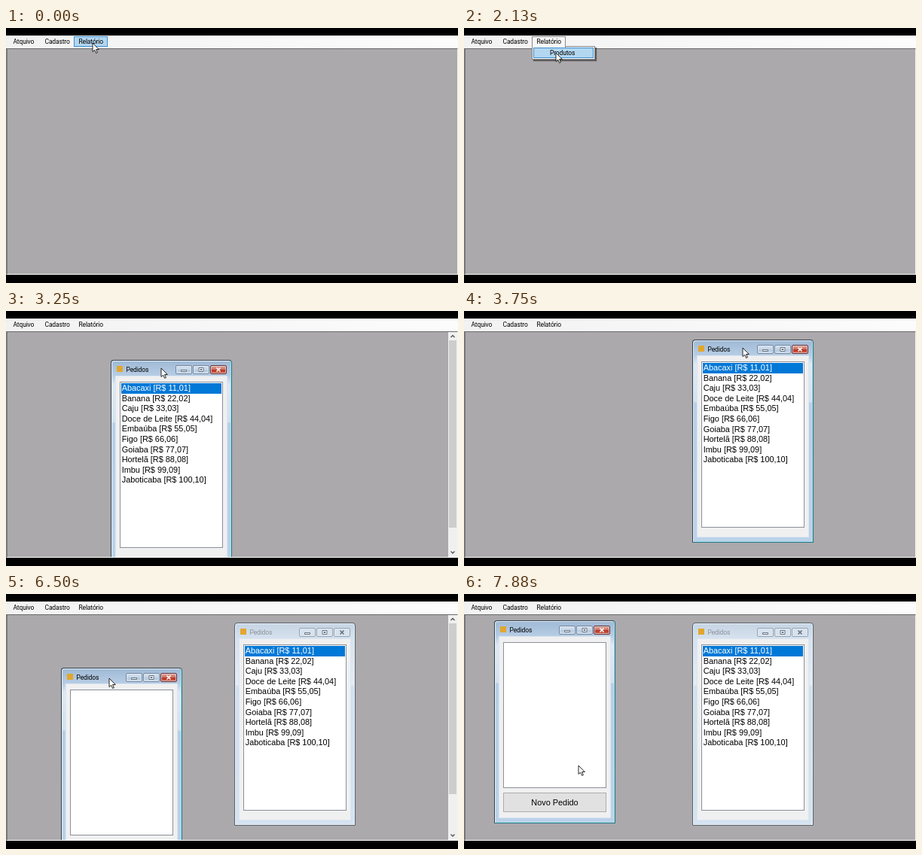
Animation of 600 by 339 pixels, one loop 8 s. Source, as an HTML page:

```html
<!DOCTYPE html>
<html lang="pt">
<head>
<meta charset="utf-8">
<style>
html, body { margin: 0; width: 100%; height: 100%; overflow: hidden; background: #000; }
#stage { position: relative; width: 600px; height: 339px; overflow: hidden; cursor: default;
  font: 8.500px/14px Roboto, "Open Sans", sans-serif; letter-spacing: -.15px; color: #000; white-space: nowrap; }
#stage div, #stage svg { position: absolute; box-sizing: border-box; }
#bar { left: 0; top: 10px; width: 600px; height: 17px; background: linear-gradient(90deg, #f2f2f3, #fcfcfd); }
.item { top: 1px; height: 15px; padding-left: 5.500px; border: 1px solid transparent; line-height: 12px; }
.item.hot { background: #b3d7f0; border-color: #3c8fcf; height: 14px; }
.item.open { background: #f7f7f8; border-color: #8b8b8d; border-bottom: 0; z-index: 2; }
#mdi { left: 0; top: 26.500px; width: 600px; height: 301.500px; overflow: hidden; background: #aba9ab;
  border: solid; border-width: 1px 1px 1px 2px; border-color: #69696b #f4f4f4 #fff #77777a; }
#area { left: -2px; top: -.500px; width: 600px; height: 300px; }
.popup { top: 24px; width: 84px; height: 18px; border: 1px solid #858587; line-height: 16px; padding-left: 23px;
  background: linear-gradient(90deg, #f7f7f7, #ededee 16px, #fcfcfd 17px); box-shadow: 2px 2px 1px #0007; }
.popup.hot { box-shadow: 2px 2px 1px #0007, inset 0 0 0 1px #fcfcfd, inset 0 0 0 2px #3c8fcf; background: #b3d7f0; }
.win { left: 0; top: 0; width: 161px; height: 269.500px; border: 1px solid; border-radius: 4px 4px 1px 1px;
  border-color: #35424e #287787 #287787 #35424e;
  background: linear-gradient(#9fb9d5, #b7cde4 20px, #dfe9f4 32px, #d3e1f0 82px, #b7cfe7 83px, #bbd2e9);
  box-shadow: inset 1px 1px #e6f0fa, inset -1px -1px #a5deea; }
.win.off { border-color: #59626b; color: #8b9299; box-shadow: inset 0 0 0 1px #eaf1f8;
  background: linear-gradient(#c6d4e4, #d5e1ee 20px, #e4ecf5 82px, #d2e0ee 83px, #d5e2f0); }
.logo { left: 7px; top: 7px; width: 8px; height: 8px; background: #e3a62c; }
.title { left: 19.500px; top: 4.500px; }
.btn { top: 6px; width: 22px; height: 12px; border: 1px solid #7688a0; border-radius: 2px;
  background: linear-gradient(#d3e0ee, #c6d6e7 50%, #b4c8dd 51%, #c8d9ea); box-shadow: inset 0 0 0 1px #e5eef7aa; }
.close { background: linear-gradient(#dda397, #ce6f60 50%, #b53124 51%, #d0604a); border-color: #6b2f33; }
.off .btn { background: #d7e2ee; border-color: #95a3b2; }
.btn svg { left: 0; top: 0; fill: #f4f7fa; stroke: #5c6976; stroke-width: .9; }
.btn.close svg { stroke: #fff; stroke-width: 1.6; }
.off .btn.close svg { stroke: #65717d; }
.client { left: 5px; top: 20px; width: 149px; height: 242px; background: #f0f0f1; border: 1px solid #dce6f0; }
.list { left: 11px; top: 28px; width: 137px; background: #fff; border: 1px solid #8b9097; padding: 1px 1px 0; }
.list, .new { font: 10.900px/13.600px "Liberation Sans", Arial, sans-serif; letter-spacing: 0; color: #000; }
.list p { margin: 0; padding-left: .700px; height: 13.600px; }
.list p:first-child { background: #0078d7; color: #fff; }
.new { left: 11px; top: 228px; width: 137px; height: 26px; border: 1px solid #adadad; background: #e1e1e1;
  line-height: 24px; text-align: center; }
#scroll { right: 1px; top: 0; width: 12px; height: 300px; background: #f0f0f1; }
#thumb { left: 1px; top: 12px; width: 10px; background: #cdcdce; }
#scroll svg { left: 0; top: 0; fill: none; stroke: #505052; stroke-width: 1.3; }
</style>
</head>
<body>
<div id="stage">
  <div id="mdi"><div id="area">
    <div id="scroll"><div id="thumb"></div>
      <svg width="12" height="300"><path d="M3.5 8L6 5.5L8.5 8M3.5 292.500L6 295L8.500 292.500"/></svg></div>
  </div></div>
  <div id="bar"></div>
  <svg id="cursor" width="12" height="17" viewBox="-1 -1 12 17" style="z-index:9">
    <path d="M0 0V11.500L2.700 9.200L4.600 13.400L6.400 12.600L4.600 8.500H8.300Z" fill="#fff" stroke="#111" stroke-width=".9"/></svg>
</div>
<script>
const $ = id => document.getElementById(id);

function add(parent, cls, html = '', style = '') {
  const el = document.createElement('div');
  el.className = cls;
  el.innerHTML = html;
  el.style.cssText = style;
  parent.append(el);
  return el;
}

const menus = [['Atquivo', 3, 42], ['Cadastro', 45, 45], ['Relatório', 90, 45]].map(([name, x, w]) =>
  ({ x, w, el: add($('bar'), 'item', name, `left:${x}px;width:${w}px`) }));

const popups = [
  { menu: 2, name: 'Produtos', from: 1130, to: 2230 },
  { menu: 1, name: 'Pedidos', from: 5000, to: 5700 }
].map(p => ({ ...p, el: add($('stage'), 'popup', p.name, `left:${menus[p.menu].x}px`) }));

const glyphs = ['M6.500 5.500h7v2h-7z', 'M7 2.500h6v5h-6zM9 4.500h2v1h-2z', 'M7.500 2.500l5 5m0-5l-5 5'];

function makeWindow(body) {
  const buttons = glyphs.map((d, i) =>
    `<div class="btn ${i == 2 ? 'close' : ''}" style="left:${85 + i * 23}px"><svg width="20" height="10"><path d="${d}"/></svg></div>`);
  return add($('area'), 'win',
    `<div class="logo"></div><div class="title">Pedidos</div>${buttons.join('')}<div class="client"></div>${body}`);
}

const products = ['Abacaxi', 'Banana', 'Caju', 'Doce de Leite', 'Embaúba', 'Figo', 'Goiaba', 'Hortelã', 'Imbu', 'Jaboticaba'];
const rows = products.map((name, i) => {
  const n = i + 1;
  return `<p>${name} [R$ ${n * 11 - (n == 10 ? 10 : 0)},${String(n).padStart(2, '0')}]</p>`;
}).join('');

// Paths are lists of [time, x, y].
const windows = [
  { from: 2250, path: [[3080, 68, 77], [3550, 303, 38]],
    el: makeWindow(`<div class="list" style="height:221px">${rows}</div>`) },
  { from: 5720, path: [[6500, 73, 98], [6980, 40, 28], [7250, 40, 35]],
    el: makeWindow('<div class="list" style="height:194px"></div><div class="new">Novo Pedido</div>') }
];
$('area').append($('scroll'));

const pointer = [
  [0, 115, 20], [900, 115, 20], [1400, 114, 18], [1600, 114, 18], [1950, 122, 33], [2250, 122, 33],
  [2750, 146, 84], [3000, 146, 84], [3080, 135, 88], [3550, 370, 49], [3800, 370, 49],
  [4380, 74, 17], [5050, 74, 17], [5350, 80, 33], [5720, 80, 33], [6250, 137, 112],
  [6500, 137, 112], [6980, 104, 42], [7250, 104, 49], [7380, 104, 49], [7800, 152, 228]
];

function along(path, t) {
  const i = path.findIndex(k => k[0] > t);
  if (i < 0) return path[path.length - 1].slice(1);
  if (!i) return path[0].slice(1);
  const [t0, x0, y0] = path[i - 1], [t1, x1, y1] = path[i];
  const u = (t - t0) / (t1 - t0), e = u * u * (3 - 2 * u);
  return [x0 + (x1 - x0) * e, y0 + (y1 - y0) * e];
}

const move = (el, x, y) => el.style.transform = `translate(${Math.round(x)}px,${Math.round(y)}px)`;
const show = (el, on) => el.style.display = on ? '' : 'none';

function draw(now) {
  const t = now % 8000;
  const [cx, cy] = along(pointer, t);
  move($('cursor'), cx - 1, cy - 1);

  const popup = popups.find(p => t >= p.from && t < p.to);
  for (const p of popups) {
    show(p.el, p == popup);
    p.el.classList.toggle('hot', cy > 26);
  }
  menus.forEach((m, i) => {
    const over = cx >= m.x && cx < m.x + m.w && cy >= 11 && cy < 26;
    m.el.classList.toggle('hot', over && !popup);
    m.el.classList.toggle('open', !!popup && popup.menu == i);
  });

  let overflow = 0;
  for (const w of windows) {
    const on = t >= w.from, [x, y] = along(w.path, t);
    show(w.el, on);
    move(w.el, x, y - 27);
    if (on) overflow = Math.max(overflow, y + 269 - 327);
  }
  windows[0].el.classList.toggle('off', t >= windows[1].from);
  show($('scroll'), overflow > 0);
  $('thumb').style.height = 276 * 300 / (325 + overflow) + 'px';
}

(function tick() {
  draw(performance.now());
  requestAnimationFrame(tick);
})();
</script>
</body>
</html>
```
